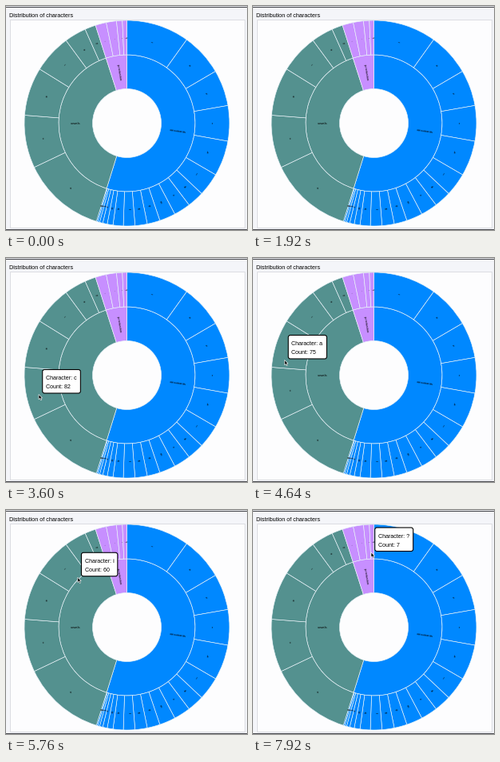
A matplotlib script for the animation above (8000 ms loop, 302 by 280 pixels).

```python
import math

import numpy as np
import matplotlib.pyplot as plt
from matplotlib.animation import FuncAnimation
from matplotlib.patches import FancyBboxPatch, Polygon, Rectangle, Wedge
from matplotlib.textpath import TextPath

W, H, DPI = 302, 280, 100
STEP, LOOP = 80, 8000
CX, CY = 151.5, 146.5
R_HOLE, R_MID, R_OUT = 43, 85.5, 128.5
PX = 72 / DPI

plt.rcParams["font.family"] = "Liberation Sans"

GROUPS = [
    ("consonants", "#0088ff", "tnsrhldcmpgfbwvkxq",
     [98, 66, 56, 55, 55, 36, 26, 26, 25, 20, 19, 18, 16, 9, 7, 5, 3, 2]),
    ("vowels", "#54918f", "ecaiuy", [130, 82, 75, 60, 34, 17]),
    ("punctuation", "#c78fff", ",.'?", [17, 16, 9, 7]),
]
TOTAL = sum(sum(g[3]) for g in GROUPS)

# pointer path: time in ms, x, y
PATH = [
    (2000, -8, 196), (2640, 30, 180), (3500, 41, 170.5), (3700, 41, 170.5),
    (4480, 39.5, 127.5), (4640, 39.5, 127.5), (5200, 57.5, 113),
    (5360, 57.5, 113), (6160, 122, 55.5), (6480, 124, 54),
    (6720, 126, 54.5), (7360, 136, 51.5), (7840, 148, 53), (8000, 148, 53),
]

fig = plt.figure(figsize=(W / DPI, H / DPI), dpi=DPI, facecolor="#f4f5f9")
ax = fig.add_axes([0, 0, 1, 1])
ax.set_xlim(0, W)
ax.set_ylim(H, 0)
ax.axis("off")


def text(x, y, s, size, **kw):
    return ax.text(x, y, s, fontsize=size * PX, color="black", **kw)


def ring_label(s, angle, r):
    """Label along the radius, turned so that it never stands upside down."""
    a = math.radians(angle)
    turn = angle - 90 + (180 if angle >= 180 else 0)
    text(CX + r * math.sin(a), CY - r * math.cos(a), s, 4.1, rotation=-turn,
         ha="center", va="center", rotation_mode="anchor", zorder=3)


def sector(a0, a1, r0, r1, color, label):
    ax.add_patch(Wedge((CX, CY), r1, a0 - 90, a1 - 90, width=r1 - r0,
                       fc=color, ec="#e8f2f8", lw=0.65 * PX, zorder=2))
    ring_label(label, (a0 + a1) / 2, (r0 + r1) / 2)


def draw_page():
    ax.add_patch(Rectangle((0, 1), W, 1, fc="#3c3c42", lw=0))
    ax.add_patch(Rectangle((4.5, 16.5), 294, 260, fc="#fdfdfe",
                           ec="#dcdde2", lw=PX))
    ax.add_patch(Rectangle((0, 279), W, 1, fc="#4a4a50", lw=0))
    text(4, 14, "Distribution of characters", 7.25)


def draw_chart():
    leaves, start = [], 0
    for name, color, chars, counts in GROUPS:
        edges = 360 * (start + np.cumsum([0] + counts)) / TOTAL
        sector(edges[0], edges[-1], R_HOLE, R_MID, color, name)
        for ch, n, a0, a1 in zip(chars, counts, edges, edges[1:]):
            sector(a0, a1, R_MID, R_OUT, color, ch)
            leaves.append((a1, ch, n))
        start += sum(counts)
    return leaves


draw_page()
leaves = draw_chart()

box = FancyBboxPatch((0, 0), 48, 29.5, fc="white", ec="black", lw=1.1 * PX,
                     boxstyle="round,pad=0,rounding_size=2.6", zorder=5)
ax.add_patch(box)
lines = [text(0, 0, "", 7.2, zorder=6) for _ in range(2)]
ARROW = np.array([(0, 0), (0, 6.2), (1.5, 4.9), (2.6, 7.2), (3.7, 6.7),
                  (2.7, 4.5), (4.5, 4.4)])
cursor = Polygon(ARROW, closed=True, fc="black", ec="white", lw=0.6 * PX,
                 zorder=7)
ax.add_patch(cursor)


def pointer(t):
    for (t0, x0, y0), (t1, x1, y1) in zip(PATH, PATH[1:]):
        if t0 <= t < t1:
            u = (t - t0) / (t1 - t0)
            u = u * u * (3 - 2 * u)
            return x0 + (x1 - x0) * u, y0 + (y1 - y0) * u
    return None


def hovered(x, y):
    dx, dy = x - CX, y - CY
    if not R_MID <= math.hypot(dx, dy) <= R_OUT:
        return None
    angle = math.degrees(math.atan2(dx, -dy)) % 360
    return next((ch, n) for end, ch, n in leaves if angle <= end + 1e-6)


def show_tip(x, y, leaf):
    rows = f"Character: {leaf[0]}", f"Count: {leaf[1]}"
    left, top = x + 4.7, y - 31
    width = TextPath((0, 0), rows[0], size=7.2).get_extents().width
    box.set_bounds(left, top, width + 9, 29.5)
    for i, (line, row) in enumerate(zip(lines, rows)):
        line.set_text(row)
        line.set_position((left + 4.3, top + 12.6 + 11 * i))


def update(i):
    pos = pointer(i * STEP)
    leaf = hovered(*pos) if pos else None
    cursor.set_visible(pos is not None)
    if pos:
        cursor.set_xy(ARROW + pos)
    for part in (box, *lines):
        part.set_visible(leaf is not None)
    if leaf:
        show_tip(*pos, leaf)
    return box, *lines, cursor


anim = FuncAnimation(fig, update, frames=LOOP // STEP, interval=STEP,
                     repeat=True, repeat_delay=0, blit=False)
plt.show()
```
